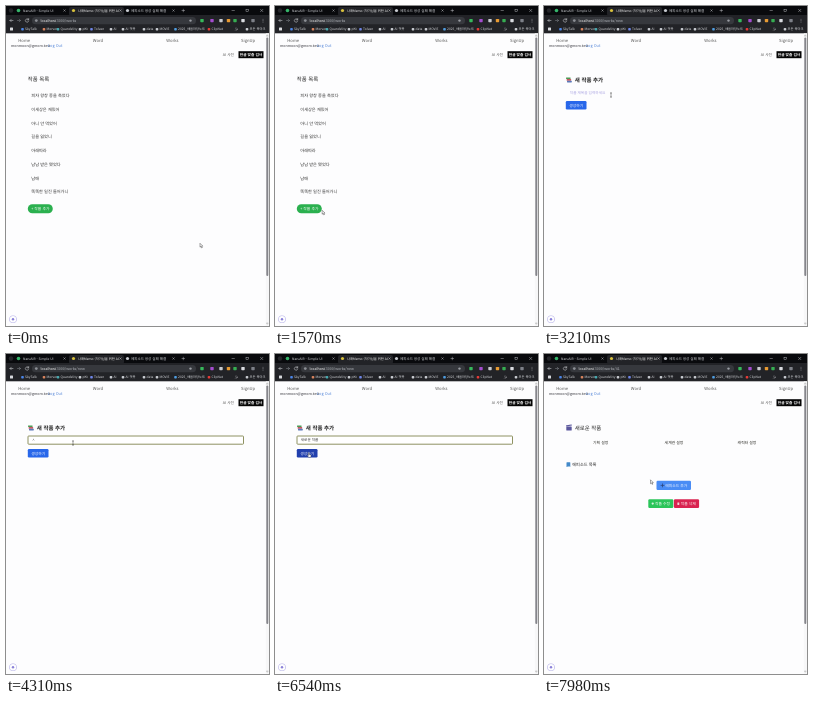
Animation, 263 px wide and 320 px high, one loop 8000 ms. Source, as an HTML page:

```html
<!DOCTYPE html>
<html lang="ko">
<head>
<meta charset="utf-8">
<title>작품 관리</title>
<style>
html, body { margin: 0; width: 100%; height: 100%; overflow: hidden; background: #fdfdfe; }
svg { display: block; width: 100vw; height: 100vh; }
text { font-family: "Noto Sans CJK KR", "Noto Sans CJK", "Noto Sans", sans-serif; text-rendering: geometricPrecision; white-space: pre; }
</style>
</head>
<body>
<svg id="stage" viewBox="0 0 263 320"></svg>
<script>
const LOOP = 8000;
const stage = document.getElementById('stage');

function add(parent, tag, attrs = {}, content = '') {
  const node = document.createElementNS('http://www.w3.org/2000/svg', tag);
  for (const [key, value] of Object.entries(attrs)) node.setAttribute(key, value);
  node.textContent = content;
  parent.append(node);
  return node;
}
const group = (parent = stage) => add(parent, 'g');
const rect = (g, x, y, width, height, fill, rx = 0) => add(g, 'rect', { x, y, width, height, fill, rx });
const dot = (g, cx, cy, r, fill) => add(g, 'circle', { cx, cy, r, fill });
const line = (g, d, stroke, width = 0.6) =>
  add(g, 'path', { d, stroke, fill: 'none', 'stroke-width': width, 'stroke-linecap': 'round' });

// y is the vertical middle of the text
function label(g, x, y, content, size = 4.2, fill = '#333', weight = 400, anchor = 'start') {
  return add(g, 'text', {
    x, y: y + size * 0.36, fill, 'font-size': size, 'font-weight': weight, 'text-anchor': anchor
  }, content);
}
function button(g, x, y, w, h, fill, caption, rx = 1.2, textX = x + w / 2) {
  const box = rect(g, x, y, w, h, fill, rx);
  label(g, textX, y + h / 2, caption, 3.8, '#fff', 500, 'middle');
  return box;
}

function drawBrowser() {
  const g = group();
  const pale = '#d8dade';
  rect(g, 0, 0, 263, 9.5, '#090a0d');
  rect(g, 63, 1, 55, 9, '#222327', 2);
  rect(g, 0, 9, 263, 18.3, '#222327');

  dot(g, 5, 4.5, 2.2, '#25262a');
  dot(g, 12.5, 4.5, 1.8, '#35b56a');
  label(g, 17, 4.5, 'NaruAIR - Simple UI', 3.3, pale);
  dot(g, 67.5, 4.5, 1.6, '#d9c13c');
  label(g, 72, 4.5, '나래Memo (작가님을 위한 AI', 3.3, '#fff');
  dot(g, 121.5, 4.5, 1.6, '#c7cad0');
  label(g, 125, 4.5, '에피소드 생성 실패 해결', 3.5, pale);
  for (const x of [58.5, 114.5, 167.5])
    line(g, `M${x - 0.8} 3.7l1.6 1.6m0-1.6l-1.6 1.6`, pale, 0.4);
  line(g, 'M176 4.5h2.6M177.3 3.2v2.6M226 4.5h2.4M254.5 3.3l2.4 2.4m0-2.4l-2.4 2.4', pale, 0.4);
  add(g, 'rect', { x: 240, y: 3.3, width: 2.3, height: 2.3, fill: 'none', stroke: pale, 'stroke-width': 0.4 });

  line(g, 'M7 14.5H4m1.3-1.3L4 14.5l1.3 1.3', pale, 0.5);
  line(g, 'M11.5 14.5h3m-1.3-1.3l1.3 1.3-1.3 1.3', '#85888e', 0.5);
  line(g, 'M22.5 13.6a1.7 1.7 0 1 0 .2 1.5M22.7 12.5v1.3h-1.3', pale, 0.5);
  rect(g, 26, 11, 164, 7.3, '#36383d', 3.6);
  dot(g, 30.3, 14.6, 1.4, '#8b8e94');
  label(g, 34.5, 14.6, 'localhost', 3.6, '#fff');
  const path = label(g, 49.8, 14.6, '', 3.6, '#b5b8be');
  dot(g, 184.5, 14.6, 1.2, '#9a9da3');

  const extensions = [[196, '#36b85b'], [206, '#a44ccf'], [215, '#c9ccd1'], [222.5, '#e79a32'],
    [229, '#36ad52'], [237, '#d9dbe0'], [247, '#7d8088']];
  for (const [x, fill] of extensions) rect(g, x - 1.7, 12.9, 3.4, 3.4, fill, 0.7);
  for (const y of [13.2, 14.6, 16]) dot(g, 257, y, 0.4, pale);

  const bookmarks = [
    [16.5, '#4b86e8', 'SkyTalk'], [38, '#d7835d', 'Morven'], [52, '#48aab0', 'Quandelity'],
    [74, '#c9ccd1', 'pKt'], [85.5, '#6f86e8', 'Tolvan'], [105, '#c9ccd1', 'AI'],
    [117, '#c9ccd1', 'AI 챗봇'], [138, '#c9ccd1', 'data'], [151, '#c9ccd1', 'MOVIE'],
    [169.5, '#4f9de0', '2025_배움마당노트'], [203, '#e83b37', 'ClipNut'], [241, '#c9ccd1', '모든 북마크']
  ];
  rect(g, 4, 21.6, 3, 3, '#d6d8dc', 0.5);
  for (const [x, fill, caption] of bookmarks) {
    rect(g, x - 1.3, 21.9, 2.6, 2.6, fill, 0.8);
    label(g, x + 2.6, 23.2, caption, 3.25, pale);
  }
  line(g, 'M229.5 22.2l1 1-1 1m1.3-2l1 1-1 1', pale, 0.4);
  return path;
}

function drawPageFrame() {
  const g = group();
  for (const [x, caption] of [[12.3, 'Home'], [86.8, 'Word'], [160.3, 'Works'], [235, 'SignUp']])
    label(g, x, 34, caption, 4.2, '#565656');
  label(g, 5, 39.5, 'monmoon@gmom.test', 3.6, '#34343c');
  label(g, 42, 39.5, 'Log Out', 3.9, '#5285d8');
  label(g, 216.8, 48.7, 'AI 사전', 3.7, '#555');
  rect(g, 232.5, 45.2, 25, 7, '#050505');
  label(g, 245, 48.7, '한글 맞춤 검사', 3.7, '#fff', 700, 'middle');
  rect(g, 259.8, 27.3, 3.2, 292.7, '#f7f7f8');
  rect(g, 260.3, 31.5, 2, 238.5, '#85858b', 1);
  line(g, 'M260.6 29.8l.7-1 .7 1zM260.6 317.3l.7 1 .7-1z', '#777', 0.3);
  dot(g, 7, 313.3, 3.8, '#b9b4ea');
  dot(g, 7, 313.3, 3.2, '#fdfdfe');
  dot(g, 7, 313.3, 1.2, '#8a80d8');
}

function drawList() {
  const g = group();
  label(g, 21.8, 73.5, '작품 목록', 5.4, '#222', 500);
  const works = ['피자 왕창 종을 축었다', '이세상은 재밌어', '아니 안 먹었어', '길을 잃었니',
    '아래따라', '남남 받은 됐었다', '남매', '똑똑한 일진 들어가니'];
  works.forEach((title, i) => label(g, 25.3, 89.7 + i * 13.72, title, 4.2));
  return { g, add: button(g, 21.8, 198.2, 25, 9, '#2bb04f', '+ 작품 추가', 4.5) };
}

function drawForm() {
  const g = group();
  rect(g, 22, 71.4, 4.6, 1.6, '#4d9c56', 0.4);
  rect(g, 22.6, 73, 4.6, 1.7, '#c75862', 0.4);
  rect(g, 23, 74.7, 4.8, 1.8, '#5b79b8', 0.4);
  label(g, 30.8, 74, '새 작품 추가', 5.5, '#222', 700);
  const focus = add(g, 'rect', {
    x: 22, y: 82, width: 215.5, height: 8.2, rx: 0.7, fill: '#fff', stroke: '#73763a', 'stroke-width': 0.8
  });
  const hint = label(g, 25.8, 86.2, '작품 제목을 입력하세요', 3.65, '#aaa4e2');
  const field = label(g, 25.8, 86.2, '', 3.6, '#333');
  const submit = button(g, 21.8, 95, 20.7, 8.5, '#2867ea', '생성하기');
  return { g, focus, hint, field, submit };
}

function drawDetail() {
  const g = group();
  rect(g, 22.3, 72.5, 5.4, 4, '#5b579d', 0.5);
  line(g, 'M22.6 71.9l4.8-.9', '#5b579d', 1.2);
  label(g, 30.8, 74, '새로운 작품', 5.45, '#222', 500);
  for (const [x, caption] of [[56.7, '기획 설정'], [130, '세계관 설정'], [203, '캐릭터 설정']])
    label(g, x, 89, caption, 3.85, '#25251f', 500, 'middle');
  rect(g, 22.5, 108.3, 3.8, 4.7, '#4389c9', 0.5);
  rect(g, 23.3, 112, 3, 0.6, '#dce9f4');
  label(g, 28.2, 110.7, '에피소드 목록', 4.2, '#222', 500);
  button(g, 112.5, 126.8, 34.5, 9.2, '#498cf5', '에피소드 추가', 1.2, 132.3);
  line(g, 'M117 131.4h3M118.5 129.9v3', '#2d3f70', 0.7);
  button(g, 104.3, 145.2, 25, 8.8, '#2bc55a', '작품 수정', 1.2, 118.5);
  dot(g, 108.7, 149.6, 1.1, '#d7f2df');
  button(g, 129.9, 145.2, 25.2, 8.8, '#d92350', '작품 삭제', 1.2, 144.2);
  rect(g, 133.4, 148.5, 1.9, 2.4, '#f2d4dc', 0.3);
  return { g };
}

function drawPointers() {
  const g = group();
  const arrow = add(g, 'path', {
    d: 'M0 0v3.9l.9-.8.7 1.5.7-.3-.7-1.5h1.2z', fill: '#fff', stroke: '#222', 'stroke-width': 0.4
  });
  const hand = add(g, 'path', {
    d: 'M-.4.1q.4-.5.8 0v1.7l1.5.4q.5.2.4.8l-.4 1.5h-2.1l-1.3-1.7q0-.7.8-.3l.3.2z',
    fill: '#fff', stroke: '#333', 'stroke-width': 0.4
  });
  const beam = line(g, 'M-.6-2h1.2M0-2v4M-.6 2h1.2', '#333', 0.45);
  return { g, arrow, hand, beam };
}

const path = drawBrowser();
drawPageFrame();
const list = drawList(), form = drawForm(), detail = drawDetail();
const pointer = drawPointers();

// time, x, y of the pointer's tip
const route = [
  [0, 194, 237.3], [40, 194, 237.3], [200, 166, 229], [700, 166, 229], [840, 160.5, 224.5],
  [970, 150, 222], [1500, 50, 205], [1900, 34, 201], [2540, 34, 201], [3000, 62, 110],
  [3200, 67, 89], [6210, 67, 89], [6500, 33.8, 98.8], [6900, 33.8, 98.8], [7010, 32, 101],
  [7240, 32, 101], [7500, 80, 119], [7740, 106.5, 125.8], [LOOP, 106.5, 125.8]
];
const typing = [
  [4310, 'ㅅ'], [4380, '새'], [4480, '샐'], [4570, '새로'], [4660, '새롱'], [4740, '새로우'],
  [4830, '새로운'], [4950, '새로운 '], [5140, '새로운 ㅈ'], [5220, '새로운 자'], [5310, '새로운 작'],
  [5420, '새로운 작ㅍ'], [5520, '새로운 작푸'], [5620, '새로운 작품']
];
const OPEN_FORM = 2200, FOCUS = 3220, OPEN_DETAIL = 6900;

const show = (node, on) => node.setAttribute('display', on ? 'inline' : 'none');

function locate(t) {
  const next = Math.max(1, route.findIndex(point => point[0] > t));
  const [t0, x0, y0] = route[next - 1], [t1, x1, y1] = route[next];
  const k = (t - t0) / (t1 - t0);
  return [x0 + (x1 - x0) * k, y0 + (y1 - y0) * k];
}

function render(t) {
  const page = t < OPEN_FORM ? 'list' : t < OPEN_DETAIL ? 'form' : 'detail';
  show(list.g, page === 'list');
  show(form.g, page === 'form');
  show(detail.g, page === 'detail');
  path.textContent = ':3000/works' + { list: '', form: '/new', detail: '/41' }[page];

  const [x, y] = locate(t);
  const overAdd = page === 'list' && x < 47 && y < 207;
  const overSubmit = page === 'form' && x < 42.5 && y > 95 && y < 103.5;
  const overInput = page === 'form' && y > 82 && y < 90.2;
  list.add.setAttribute('fill', overAdd ? '#249844' : '#2bb04f');
  form.submit.setAttribute('fill', overSubmit ? '#213fae' : '#2867ea');

  const typed = typing.filter(([time]) => time <= t).pop();
  form.field.textContent = typed ? typed[1] : '';
  show(form.hint, !typed);
  show(form.focus, t >= FOCUS);

  const hand = overAdd || overSubmit || (page === 'form' && t < 2600);
  show(pointer.hand, hand);
  show(pointer.beam, overInput);
  show(pointer.arrow, !hand && !overInput);
  pointer.g.setAttribute('transform', `translate(${x} ${y})`);
}

const start = performance.now();
function tick() {
  render((performance.now() - start) % LOOP);
  requestAnimationFrame(tick);
}
tick();
</script>
</body>
</html>
```
